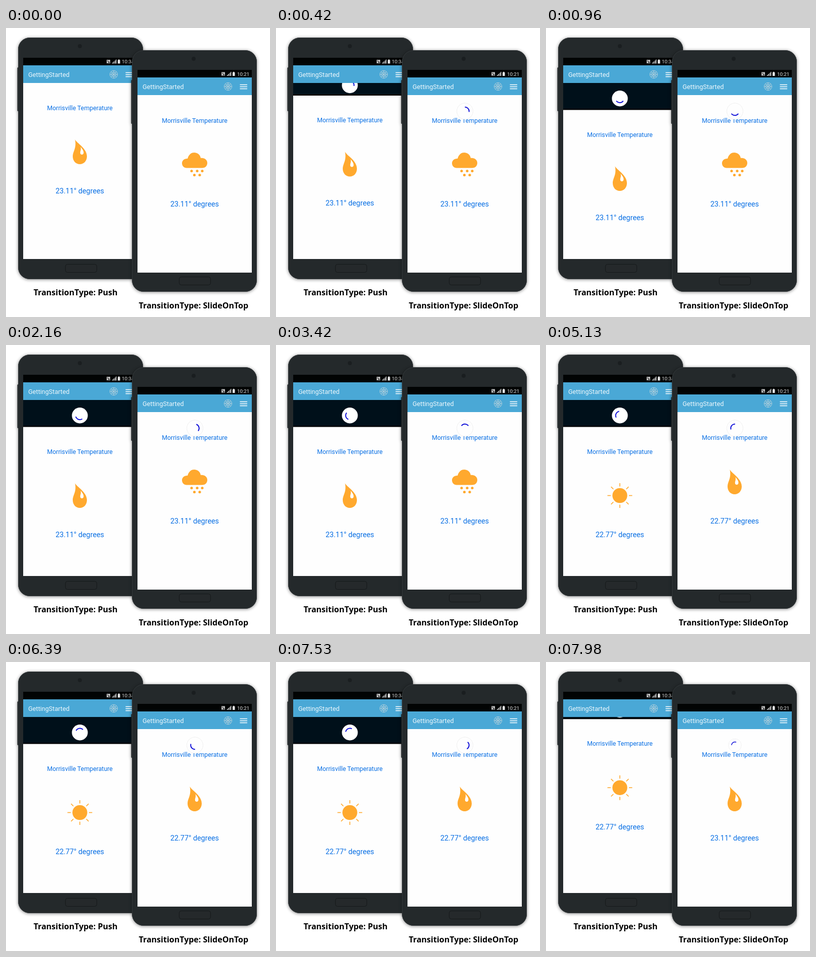
An HTML page that plays this animation: 522 by 573 pixels, repeating every 8000 ms.

```html
<!DOCTYPE html>
<html lang="en">
<head>
<meta charset="utf-8">
<title>Pull to refresh transitions</title>
<style>
  html, body { margin: 0; width: 100%; height: 100%; overflow: hidden; background: #fff; }
  svg { display: block; width: 522px; height: 573px; }
  text { font-family: Roboto, sans-serif; }
  .caption { font: 700 16px "Open Sans", sans-serif; }
  .title { font-size: 12.6px; fill: #eef8fc; }
  .clock { font-size: 9.7px; fill: #e4e4e4; }
  .place { font-size: 12.35px; fill: #0a70e4; text-anchor: middle; }
  .degrees { font-size: 14.35px; fill: #0a70e4; text-anchor: middle; }
  .weather { fill: #ffa92e; }
  .arc { fill: none; stroke: #1010d8; stroke-width: 2; }
  .phone { filter: drop-shadow(0 1px 3px #0007); }
</style>
</head>
<body>
<svg viewBox="0 0 522 573">
  <defs>
    <clipPath id="screen"><rect x="34" y="74" width="226" height="384"/></clipPath>
    <g id="body">
      <rect x="22.5" y="78" width="4" height="87" rx="1.5" fill="#1c2123"/>
      <rect x="24" y="19" width="247" height="479" rx="23" fill="#24292b"/>
      <rect x="24.5" y="19.5" width="246" height="478" rx="22.5" fill="none" stroke="#34393b"/>
      <circle cx="146" cy="36" r="4" fill="#1a1e20"/>
      <rect x="117.500" y="468.500" width="62" height="16" rx="4" fill="#25292b" stroke="#15191a"/>
    </g>
    <g id="bars">
      <rect x="34" y="59" width="226" height="15" fill="#020404"/>
      <rect x="34" y="74" width="226" height="35" fill="#4aa8d6"/>
      <text class="title" x="44" y="96.500">GettingStarted</text>
      <g fill="none" stroke="#bcd3dc" stroke-width=".9">
        <circle cx="213" cy="92" r="7.6"/>
        <circle cx="213" cy="92" r="4.4"/>
        <path d="M205.400 92h15.200M213 84.400v15.200M207.600 86.600l10.800 10.800M218.400 86.600l-10.800 10.800"/>
      </g>
      <path d="M236.500 88.500h14.500M236.500 92.500h14.500M236.500 96.500h14.500" stroke="#fff" stroke-width="1.7"/>
    </g>
    <g id="indicators" fill="#e4e4e4">
      <path d="M199 63h7v7h-7z" fill="#bbb"/>
      <path d="M200 64.500l5 4M202 68.500h3" stroke="#111"/>
      <path d="M210 70.500v-2h1.500v2zM212.500 70.500v-4h1.500v4zM215 70.500v-6h1.300v6zM217 70.500v-8h1.300v8z"/>
      <path d="M221 63.500h1.300v-1.300h2v1.300h1.300v7h-4.600z"/>
    </g>
    <g id="drop" class="weather">
      <path d="M-9.500-24.500C-6-17 14-7 14 9C14 18 8 24.500 0 24.500S-14 18-14 9C-14-1-6-7-9.500-24.500Z"/>
      <path d="M1.500-10C4-6 7.500-3 7.500 1.500C7.500 4 6 5.500 4 5.500S.8 4 .8 2C.8-2 3-4 1.500-10Z" fill="#fff"/>
    </g>
    <g id="sun" class="weather">
      <circle r="14.700"/>
      <g id="rays" stroke="#ffa92e" stroke-width="1.6"></g>
    </g>
    <g id="cloud" class="weather">
      <path d="M-16 6C-21 6-25 2-25-3.500S-20-13-14-12.500C-12-20-7-24.500-1-24.500C6-24.500 11-20 12-13.500C19-14.500 25-10 25-4C25 2 21 6 15 6Z"/>
      <path d="M-6 12h.01M5 12h.01M15 12h.01M-.5 20h.01M10 20h.01" stroke="#ffa92e" stroke-width="5.2" stroke-linecap="round"/>
    </g>
  </defs>

  <rect width="522" height="573" fill="#fff"/>

  <g>
    <use href="#body" class="phone"/>
    <g clip-path="url(#screen)">
      <rect x="34" y="74" width="226" height="384" fill="#00101a"/>
      <g id="page">
        <rect x="34" y="109" width="226" height="400" fill="#fefefe"/>
        <path id="edge" d="M34 108.500h226" stroke="#000" stroke-width="2"/>
        <text class="place" x="146" y="162.500">Morrisville Temperature</text>
        <use id="pushIcon" href="#drop" x="146" y="245.500"/>
        <text id="pushDegrees" class="degrees" x="146" y="328"></text>
      </g>
      <g id="pushSpinner">
        <circle r="15.700" fill="#fff"/>
        <circle class="arc" r="8.300" pathLength="360"/>
      </g>
    </g>
    <use href="#bars"/>
    <use href="#indicators"/>
    <text class="clock" x="229" y="70">10:34</text>
    <text class="caption" x="54.500" y="530">TransitionType: Push</text>
  </g>

  <g>
    <use href="#body" class="phone" x="225" y="25"/>
    <rect x="260" y="83" width="226" height="402" fill="#fefefe"/>
    <text class="place" x="373" y="187.500">Morrisville Temperature</text>
    <use id="slideIcon" href="#cloud" x="373" y="271.500"/>
    <text id="slideDegrees" class="degrees" x="373" y="354"></text>
    <g id="slideSpinner">
      <circle r="16" fill="#fefefe" stroke="#d8d8d8" stroke-width=".7" stroke-dasharray="1.500 1"/>
      <circle class="arc" r="8.300" pathLength="360"/>
    </g>
    <use href="#bars" x="226" y="24"/>
    <use href="#indicators" x="227" y="24.500"/>
    <text class="clock" x="457" y="94.500">10:21</text>
    <text class="caption" x="262.500" y="556">TransitionType: SlideOnTop</text>
  </g>
</svg>
<script>
const LOOP = 8000, PULL = 53, SPIN_ARC = 110;
const $ = id => document.getElementById(id);
const ramp = (t, from, to) => Math.min(1, Math.max(0, (t - from) / (to - from)));

$('rays').innerHTML = Array.from({ length: 8 }, (_, i) =>
  `<path d="M18 0H24.500" transform="rotate(${i * 45})"/>`).join('');

// Two refresh cycles; the angles are the arc middles at time `at`.
const cycles = [
  { pull: 30, load: 880, release: 3780, end: 4040, shrink: 3930, at: 960, push: 90, slide: 90 },
  { pull: 4055, load: 4940, release: 7730, end: 8000, shrink: 7960, at: 5130, push: 205, slide: 217 }
];

function setArc(spinner, t, cycle, angle, speed) {
  const progress = ramp(t, cycle.pull, cycle.load);
  const spinning = progress === 1;
  const length = spinning ? SPIN_ARC : 320 * progress ** 1.5;
  const start = spinning ? angle + speed * (t - cycle.at) - SPIN_ARC / 2 : -90;
  const arc = spinner.querySelector('.arc');
  arc.setAttribute('stroke-dasharray', `${length} ${360 - length}`);
  arc.setAttribute('transform', `rotate(${start % 360})`);
  arc.style.visibility = length ? 'visible' : 'hidden';
}

function draw(t) {
  const cycle = cycles[t < cycles[1].pull ? 0 : 1];
  const offset = PULL * (ramp(t, cycle.pull, cycle.load) - ramp(t, cycle.release, cycle.end));

  $('page').setAttribute('transform', `translate(0 ${offset})`);
  $('edge').style.visibility = offset > 0 ? 'visible' : 'hidden';
  $('pushSpinner').setAttribute('transform', `translate(146 ${91 + 0.92 * offset})`);
  setArc($('pushSpinner'), t, cycle, cycle.push, 0.616);
  $('pushIcon').setAttribute('href', t < 4045 ? '#drop' : '#sun');
  $('pushDegrees').textContent = t < 4045 ? '23.11° degrees' : '22.77° degrees';

  const scale = t > cycle.pull ? 1 - ramp(t, cycle.shrink, cycle.shrink + 100) : 0;
  $('slideSpinner').setAttribute('transform', `translate(373.500 165) scale(${scale})`);
  setArc($('slideSpinner'), t, cycle, cycle.slide, 0.512);
  $('slideIcon').setAttribute('href', t < 4000 ? '#cloud' : '#drop');
  $('slideDegrees').textContent = t < 3970 || t >= 7960 ? '23.11° degrees' : '22.77° degrees';
}

const begin = performance.now();
function tick() {
  draw((performance.now() - begin) % LOOP);
  requestAnimationFrame(tick);
}
tick();
</script>
</body>
</html>
```
